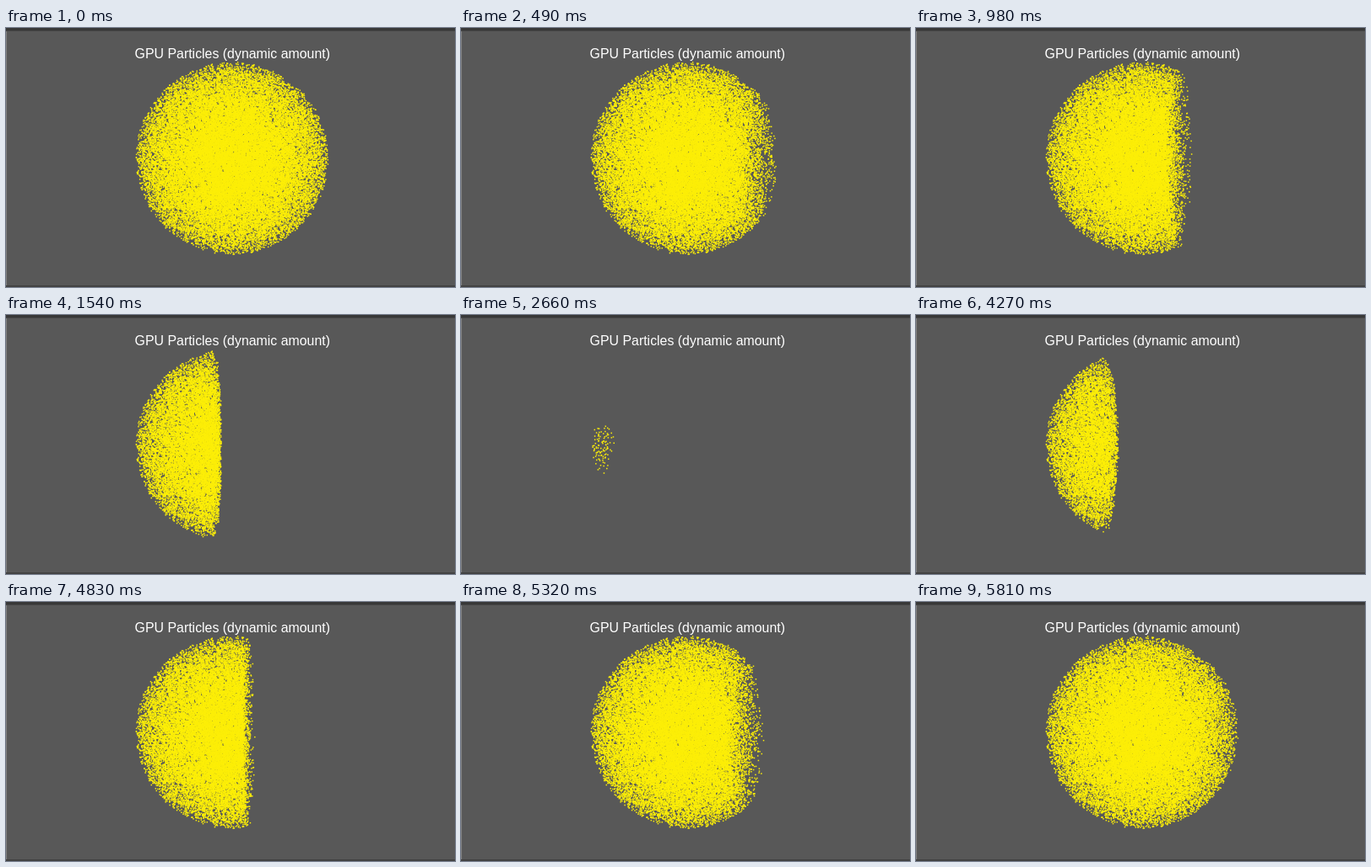
These frames come from a looping animation (532 by 308 pixels, 5.88 s). An HTML page with a canvas:

```html
<!DOCTYPE html>
<html lang="en">
<head>
<meta charset="utf-8">
<title>GPU Particles</title>
<style>
  html, body { margin: 0; width: 532px; height: 308px; overflow: hidden; background: #585858; }
  canvas { display: block; }
</style>
</head>
<body>
<canvas id="stage" width="532" height="308"></canvas>
<script>
const LOOP = 5880, STEP = 70;
const COUNT = 42000, DOT = 1.5;
const CENTER = { x: 268, y: 155 }, RADIUS = 114.5;
const CAMERA = 2.4; // distance from the centre of the unit sphere
const FOCAL = RADIUS * Math.sqrt(CAMERA * CAMERA - 1);

const ctx = document.getElementById('stage').getContext('2d');

function seeded(seed) {
  return () => {
    seed = (seed + 0x6D2B79F5) | 0;
    let h = Math.imul(seed ^ (seed >>> 15), 1 | seed);
    h = (h + Math.imul(h ^ (h >>> 7), 61 | h)) ^ h;
    return ((h ^ (h >>> 14)) >>> 0) / 4294967296;
  };
}

// Uniform points in a ball, ordered from left to right.
function makeParticles() {
  const random = seeded(7);
  const list = [];
  while (list.length < COUNT) {
    const [x, y, z] = [0, 0, 0].map(() => random() * 2 - 1);
    if (x * x + y * y + z * z > 1) continue;
    const scale = FOCAL / (CAMERA - z);
    list.push({ x, px: CENTER.x + x * scale, py: CENTER.y + y * scale });
  }
  return list.sort((a, b) => a.x - b.x);
}

const particles = makeParticles();

// Particles left of this plane are alive.
const cutAt = t => -Math.cos(Math.PI * (t - 3015) / 3300);

function drawBackdrop() {
  ctx.fillStyle = '#585858';
  ctx.fillRect(0, 0, 532, 308);
  ctx.fillStyle = '#383838';
  ctx.fillRect(0, 0, 532, 3.5);
  ctx.fillStyle = '#424242';
  ctx.fillRect(0, 306, 532, 2);
  ctx.fillStyle = '#808080';
  ctx.fillRect(0, 4, 1, 302);
}

function drawTitle() {
  ctx.fillStyle = '#fff';
  ctx.font = '15.9px "Liberation Sans", Arial, sans-serif';
  ctx.textAlign = 'center';
  ctx.fillText('GPU Particles (dynamic amount)', 268.3, 35.5);
}

function draw(t) {
  const cut = cutAt(t);
  drawBackdrop();
  ctx.fillStyle = '#fcee08';
  for (const p of particles) {
    if (p.x > cut) break;
    ctx.fillRect(p.px - DOT / 2, p.py - DOT / 2, DOT, DOT);
  }
  drawTitle();
}

let start = null, shown = -1;
function tick(now) {
  start ??= now;
  const t = Math.floor(((now - start) % LOOP) / STEP) * STEP;
  if (t !== shown) draw(shown = t);
  requestAnimationFrame(tick);
}
draw(0);
requestAnimationFrame(tick);
</script>
</body>
</html>
```
